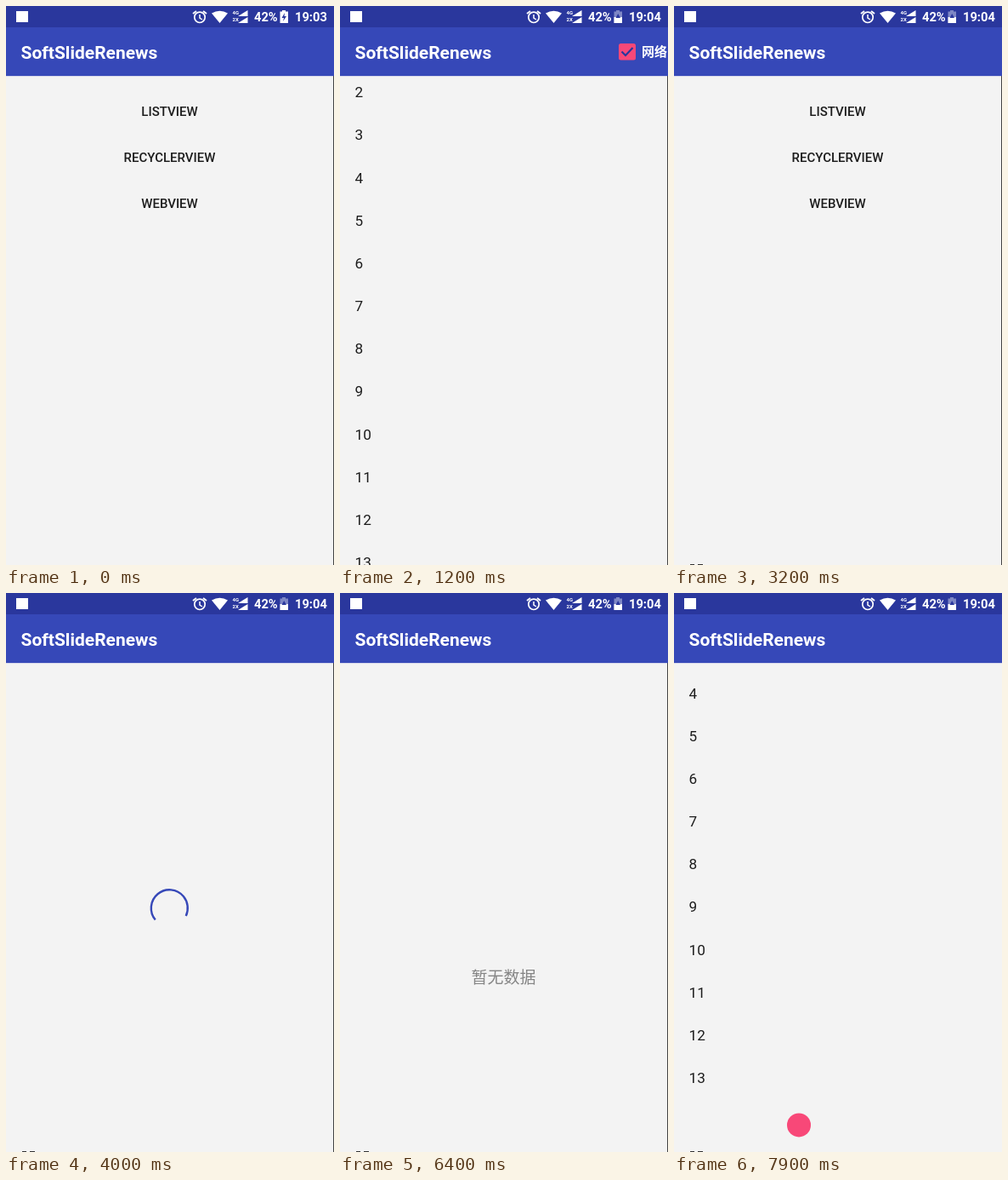
An HTML page with a canvas for the animation above (8 s loop, 386 by 656 pixels).

```html
<!DOCTYPE html>
<html lang="en">
<head>
<meta charset="utf-8">
<title>Pull to reload</title>
<style>
  html, body { margin: 0; width: 100%; height: 100%; overflow: hidden; background: #f3f3f3; }
  canvas { display: block; width: 386px; height: 656px; }
</style>
</head>
<body>
<canvas id="stage"></canvas>
<script>
const W = 386, H = 656, LOOP = 8000;
const TOP = 82, ROW = 50.15, ITEMS = 13, FOOTER = 61;
const INK = '#1c1c1c', PINK = '#f84878', BLUE = '#3648b8', DARK = '#2a379d', PAPER = '#f3f3f3';
const LATIN = 'Roboto, sans-serif';
const CJK = '"Noto Sans CJK SC", "Noto Sans CJK", sans-serif';

const canvas = document.getElementById('stage');
const ctx = canvas.getContext('2d');
const ratio = window.devicePixelRatio || 1;
canvas.width = W * ratio;
canvas.height = H * ratio;

// Scroll offsets as [time, offset]; negative values pull the list down.
const SCROLL = [
  [0, 0], [400, 0], [650, -61], [800, -61], [950, 0], [1050, 0],
  [1200, 56], [1450, 140], [1600, 140], [1800, 0], [1900, 0],
  [2050, -61], [2200, -61], [2300, 0], [4550, 0], [4750, -61],
  [4950, -61], [5100, 0], [7100, 0], [7500, 140], [8000, 140]
];

// Pages as [start, page].
const PAGES = [
  [0, 'menu'], [100, 'loading'], [300, 'list'], [2500, 'menu'],
  [3600, 'loading'], [4400, 'list'], [5300, 'loading'],
  [5900, 'empty'], [6700, 'list']
];

const ease = p => p * p * (3 - 2 * p);

function track(keys, t) {
  const i = keys.findIndex(k => k[0] > t);
  if (i < 0) return keys[keys.length - 1][1];
  const [t0, a] = keys[i - 1], [t1, b] = keys[i];
  return a + (b - a) * ease((t - t0) / (t1 - t0));
}

const pageAt = t => PAGES.filter(p => p[0] <= t).pop()[1];

function rect(x, y, w, h, color) {
  ctx.fillStyle = color;
  ctx.fillRect(x, y, w, h);
}

function poly(points, color) {
  ctx.fillStyle = color;
  ctx.beginPath();
  points.forEach(([x, y]) => ctx.lineTo(x, y));
  ctx.fill();
}

function line(points, color, width) {
  ctx.strokeStyle = color;
  ctx.lineWidth = width;
  ctx.beginPath();
  points.forEach(([x, y]) => ctx.lineTo(x, y));
  ctx.stroke();
}

function disc(x, y, r, color) {
  ctx.fillStyle = color;
  ctx.beginPath();
  ctx.arc(x, y, r, 0, Math.PI * 2);
  ctx.fill();
}

// Places text by the vertical centre of its capitals.
function text(str, x, y, size, color, { weight = 400, align = 'left', family = LATIN } = {}) {
  ctx.font = `${weight} ${size}px ${family}`;
  ctx.fillStyle = color;
  ctx.textAlign = align;
  ctx.fillText(str, x, y + size * 0.355);
}

function statusBar(t) {
  rect(0, 0, W, 25, DARK);
  rect(12, 6, 14, 13, '#fff');

  ctx.strokeStyle = '#fff';
  ctx.lineWidth = 1.7;
  ctx.beginPath();
  ctx.arc(228, 13.3, 6.2, 0, Math.PI * 2);
  ctx.stroke();
  line([[228, 10], [228, 14], [231, 16]], '#fff', 1.5);
  line([[220, 9], [224, 6]], '#fff', 2);
  line([[232, 6], [236, 9]], '#fff', 2);

  ctx.fillStyle = '#fff';
  ctx.beginPath();
  ctx.moveTo(251.5, 20);
  ctx.lineTo(242, 8.5);
  ctx.quadraticCurveTo(251.5, 3, 261, 8.5);
  ctx.fill();

  ['4G', '2X'].forEach((label, i) => {
    const y = 5 + i * 8;
    poly([[284.5, y], [284.5, y + 7], [273, y + 7]], '#fff');
    text(label, 266.5, y + 3, 6, '#fff', { weight: 700 });
  });

  text('42%', 292, 13, 14.7, '#fff', { weight: 700 });
  const charging = t < 100;
  rect(325, 5, 4, 2, charging ? '#fff' : '#7e87c5');
  rect(322.5, 6.5, 9.5, 13.5, charging ? '#fff' : '#7e87c5');
  if (charging) {
    poly([[328, 8], [324.5, 14], [327, 14], [326, 18], [330, 12], [327.5, 12]], DARK);
  } else {
    rect(322.5, 13, 9.5, 7, '#fff');
    poly([[327.2, 9], [330, 14], [324.5, 14]], DARK);
  }
  text(t < 100 ? '19:03' : '19:04', 340, 13, 14.7, '#fff', { weight: 700 });
}

function toolbar(t) {
  rect(0, 25, W, TOP - 24.85, BLUE);
  text('SoftSlideRenews', 17.5, 54.3, 21, '#fff', { weight: 700 });
  if (t < 100 || t >= 2500) return;

  if (t < 1900) {
    ctx.fillStyle = PINK;
    ctx.beginPath();
    ctx.roundRect(328, 44, 20, 19.5, 2.5);
    ctx.fill();
    line([[331.5, 53.5], [336, 58], [344.5, 49]], DARK, 2.2);
  } else {
    ctx.strokeStyle = '#fff';
    ctx.lineWidth = 2;
    ctx.beginPath();
    ctx.roundRect(329, 45, 18, 17, 1.5);
    ctx.stroke();
  }
  text('网络', 355, 53.5, 15, '#fff', { weight: 700, family: CJK });
}

function menu() {
  ['LISTVIEW', 'RECYCLERVIEW', 'WEBVIEW'].forEach((label, i) =>
    text(label, 192.5, 124 + i * 54, 15, INK, { weight: 500, align: 'center' }));
}

function spinner(t) {
  const s = (t - 4000) / 1000;
  const swing = Math.sin(s * 4.7);
  const start = 2.44 + s * 5.2 + swing * 0.8;
  ctx.strokeStyle = BLUE;
  ctx.lineWidth = 2.4;
  ctx.beginPath();
  ctx.arc(192.3, 369.8, 21.5, start, start + 4.28 - swing * 1.2);
  ctx.stroke();
}

function list(t) {
  const scroll = track(SCROLL, t);
  const fresh = t >= 2250 && t < 2500;
  const labels = Array.from({ length: ITEMS }, (_, i) => String(i + 1));
  if (fresh) labels.unshift('新数据');

  labels.forEach((label, i) => {
    const y = TOP + ROW * (i + 0.5) - scroll;
    const style = fresh && i === 0 ? { family: CJK } : {};
    text(label, 17.5, y, 17.15, INK, style);
  });

  if (scroll < 0) disc(147, TOP - scroll - FOOTER / 2, 14, PINK);
  if (scroll > 0) disc(147, TOP + ROW * labels.length + FOOTER / 2 - scroll, 14, PINK);
}

function empty() {
  text('暂无数据', 192.5, 450.8, 19, '#858585', { weight: 300, align: 'center', family: CJK });
}

const draw = { menu, list, empty, loading: spinner };

function render(t) {
  ctx.setTransform(ratio, 0, 0, ratio, 0, 0);
  rect(0, 0, W, H, PAPER);
  draw[pageAt(t)](t);
  if (t >= 2500) {
    rect(19, 655, 5, 1, '#333');
    rect(28, 655, 6, 1, '#333');
  }
  if (t < 6700) rect(385, TOP, 1, H - TOP, '#444');
  toolbar(t);
  statusBar(t);
}

const began = performance.now();
function tick() {
  render((performance.now() - began) % LOOP);
  requestAnimationFrame(tick);
}
tick();
</script>
</body>
</html>
```
